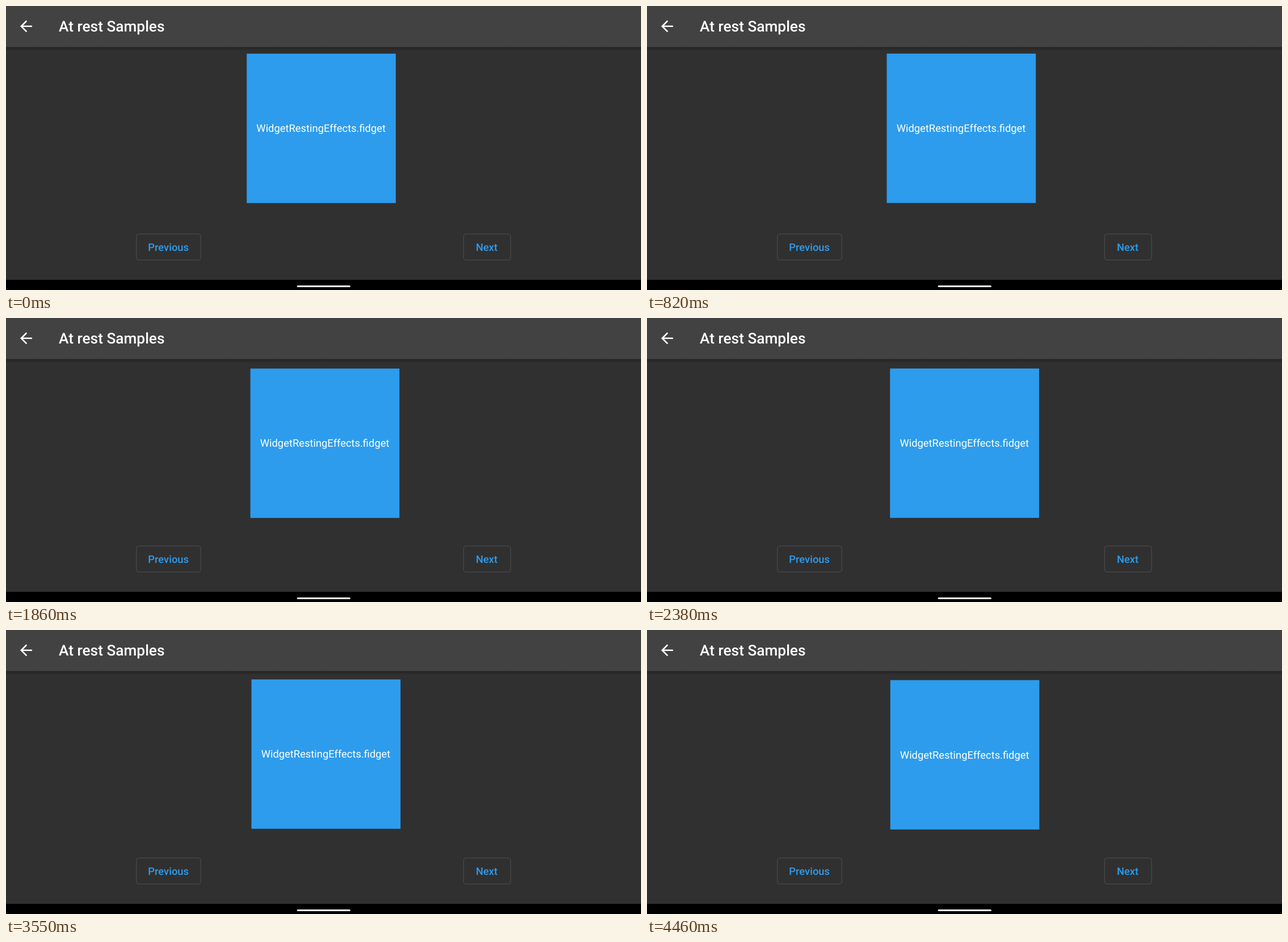
Write an HTML page that moves like this. It is 1119 px wide and 501 px high and loops after 4500 ms.

```html
<!DOCTYPE html>
<html lang="en">
<head>
<meta charset="utf-8">
<title>At rest Samples</title>
<style>
  html, body { margin: 0; width: 100%; height: 100%; overflow: hidden; background: #303030; }
  svg { display: block; width: 100%; height: 100%; }
  text { font: 18.375px Roboto, sans-serif; fill: #fff; text-rendering: geometricPrecision; }
  .mid { text-anchor: middle; }
  .title { font-size: 26.25px; font-weight: 500; }
  .button text { fill: #2d9ced; font-weight: 500; }
  .button rect { fill: none; stroke: #494949; stroke-width: 1.3; }
</style>
</head>
<body>
<svg viewBox="0 0 1119 501">
  <defs>
    <linearGradient id="shade" x2="0" y2="1">
      <stop offset="0" stop-opacity=".4"/>
      <stop offset=".4" stop-opacity=".14"/>
      <stop offset="1" stop-opacity="0"/>
    </linearGradient>
  </defs>
  <rect width="1119" height="501" fill="#303030"/>

  <g id="card">
    <rect width="262.7" height="263.5" fill="#2d9ced"/>
    <text class="mid" x="131" y="138.2">WidgetRestingEffects.fidget</text>
  </g>

  <rect y="72" width="1119" height="8" fill="url(#shade)"/>
  <rect width="1119" height="72.6" fill="#424242"/>
  <path transform="translate(19.7 20) scale(1.3125)" fill="#fff"
    d="M20 11H7.83l5.59-5.59L12 4l-8 8 8 8 1.41-1.41L7.83 13H20z"/>
  <text class="title" x="93" y="45.2">At rest Samples</text>

  <g class="button">
    <rect x="229.8" y="402.2" width="113.4" height="46" rx="4.5"/>
    <text class="mid" x="286.2" y="431.6">Previous</text>
    <rect x="806.4" y="402.2" width="82.8" height="46" rx="4.5"/>
    <text class="mid" x="847.1" y="431.6">Next</text>
  </g>

  <rect y="483" width="1119" height="18"/>
  <rect x="512.7" y="493" width="94.2" height="3" rx="1.5" fill="#fff"/>
</svg>
<script>
  const LOOP = 4500;
  // Points the card drifts between: time, left, top
  const stops = [
    [0, 424.2, 84.1], [820, 422.5, 84], [1340, 427.3, 86.8], [1860, 430.6, 89.2],
    [2900, 425.9, 89], [3550, 432.5, 87.2], [4460, 428.7, 88.4]
  ];
  const card = document.getElementById('card');

  function place(t) {
    const i = Math.max(1, stops.findIndex(s => s[0] >= t));
    const [t0, ...from] = stops[i - 1], [t1, ...to] = stops[i];
    const u = (t - t0) / (t1 - t0), k = u * u * (3 - 2 * u);
    const at = from.map((v, n) => v + (to[n] - v) * k);
    card.setAttribute('transform', `translate(${at})`);
  }

  let start;
  function tick(now) {
    start ??= now;
    place(Math.min((now - start) % LOOP, stops.at(-1)[0]));
    requestAnimationFrame(tick);
  }
  place(0);
  requestAnimationFrame(tick);
</script>
</body>
</html>
```
